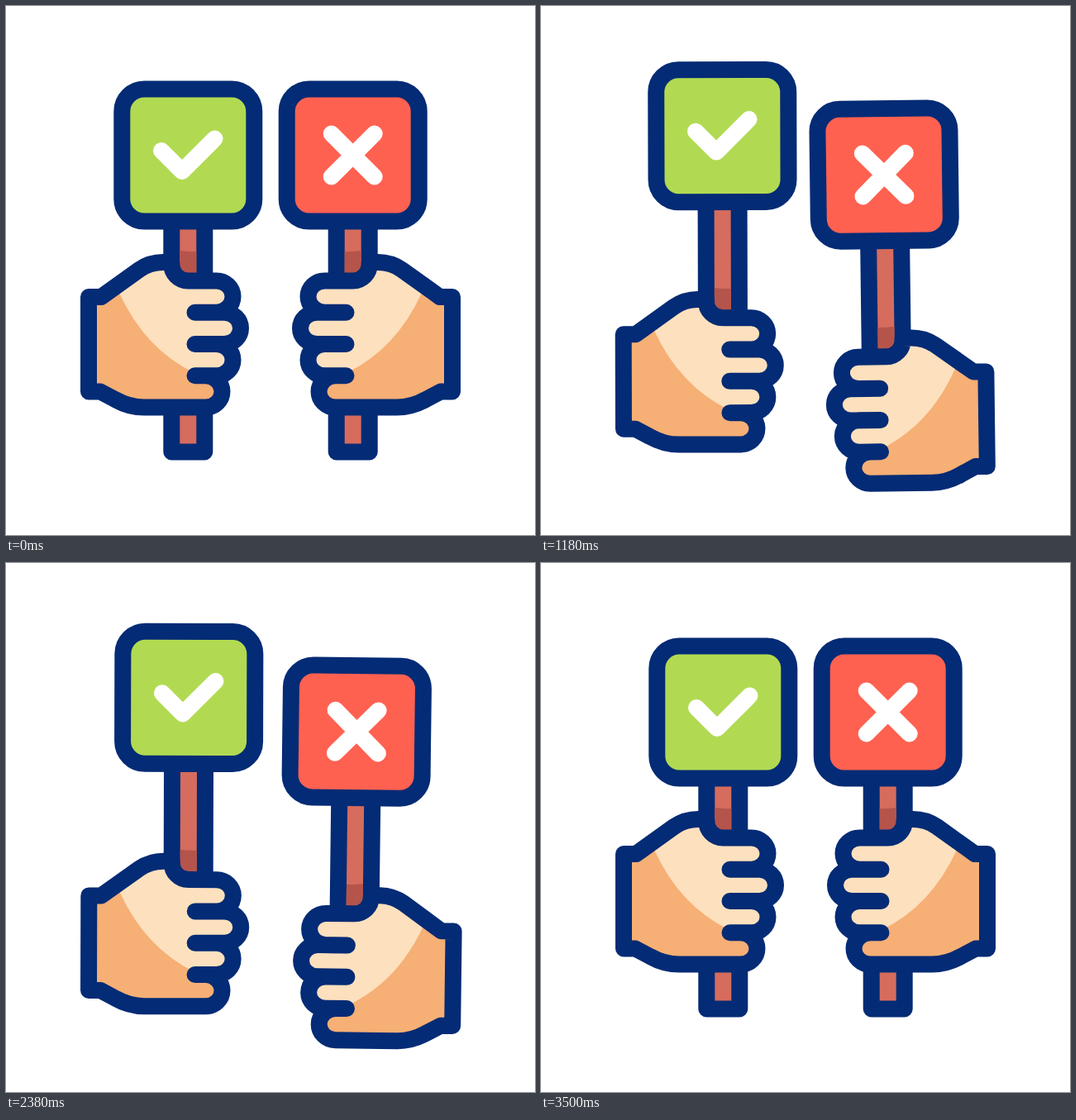
Recreate the animation shown at these times as an HTML page. Size 640x640 px, loop 3600 ms.

```html
<!DOCTYPE html>
<html lang="en">
<head>
<meta charset="utf-8">
<title>Voting signs</title>
<style>
  html, body { margin: 0; height: 100%; overflow: hidden; background: #fff; }
  svg { display: block; width: 100vw; height: 100vh; }
  .ink { stroke: #042b75; stroke-width: 20; stroke-linejoin: round; }
  .mark { fill: none; stroke: #fff; stroke-width: 20; stroke-linecap: round; stroke-linejoin: round; }
</style>
</head>
<body>
<svg viewBox="0 0 640 640">
  <defs>
    <path id="palm" d="M100 352H115L161 319Q174 310 190 310H200.3V312A20 20 0 0 0 220.3 332.4
      H254.5a20 19.15 0 0 1 0 38.3H228.5H264a20 19.15 0 0 1 0 38.3H228.5
      H254.5a20 19.15 0 0 1 0 38.3H228.5H241.5a20 19.15 0 0 1 0 38.3
      H167Q149 485.6 132 476L114 466.5H100Z"/>
    <clipPath id="inside"><use href="#palm"/></clipPath>
  </defs>
  <g id="left">
    <g id="arm">
      <rect class="ink" x="200.3" y="260" width="40" height="279.5" fill="#d66c5d"/>
      <g id="hand">
        <path d="M210.3 296Q220 297.5 230.3 297V330H210.3Z" fill="#b5544b"/>
        <use href="#palm" fill="#f6af75"/>
        <path clip-path="url(#inside)" d="M133 338L137 347Q168 415 228 444V447H300V300H133Z" fill="#fde0be"/>
        <use class="ink" href="#palm" fill="none"/>
      </g>
    </g>
    <rect class="ink" x="140.3" y="100.5" width="160" height="160" rx="27" fill="#b1da52"/>
    <path class="mark" d="M188 175L213 200L252.5 160.5"/>
  </g>
  <g id="right">
    <use href="#arm" transform="matrix(-1 0 0 1 640 0)"/>
    <rect class="ink" x="339.7" y="100.5" width="160" height="160" rx="27" fill="#ff6151"/>
    <path class="mark" d="M393.7 154.5l52 52m0-52l-52 52"/>
  </g>
</svg>
<script>
const LOOP = 3600, RAISED = 600, LOWER = 3000, REST = 3500, SWING = 400;
const [left, right, hand] = ['left', 'right', 'hand'].map(id => document.getElementById(id));
const ease = u => u * u * (3 - 2 * u);

// Each sign turns about the foot of its stick.
function pose(sign, x, y, angle) {
  sign.setAttribute('transform', `translate(0 ${y}) rotate(${angle} ${x} 549.5)`);
}

function draw(now) {
  const t = now % LOOP;
  let reach = 1, tilt, lift = 0;
  if (t < RAISED) {
    tilt = reach = ease(t / RAISED);
  } else if (t < LOWER) {
    const beat = (t - RAISED) / SWING, step = Math.floor(beat);
    const sway = ease(beat - step);
    lift = step % 2 ? 1 - sway : sway;
    tilt = 1 - 2 * lift;
  } else {
    tilt = reach = 1 - ease(Math.min(1, (t - LOWER) / (REST - LOWER)));
  }
  hand.setAttribute('transform', `translate(0 ${68.3 * reach})`);
  pose(left, 220.3, -41 * lift, tilt);
  pose(right, 419.7, 23.6 * reach, 5 * tilt);
}

function tick() {
  draw(performance.now());
  requestAnimationFrame(tick);
}
tick();
</script>
</body>
</html>
```
